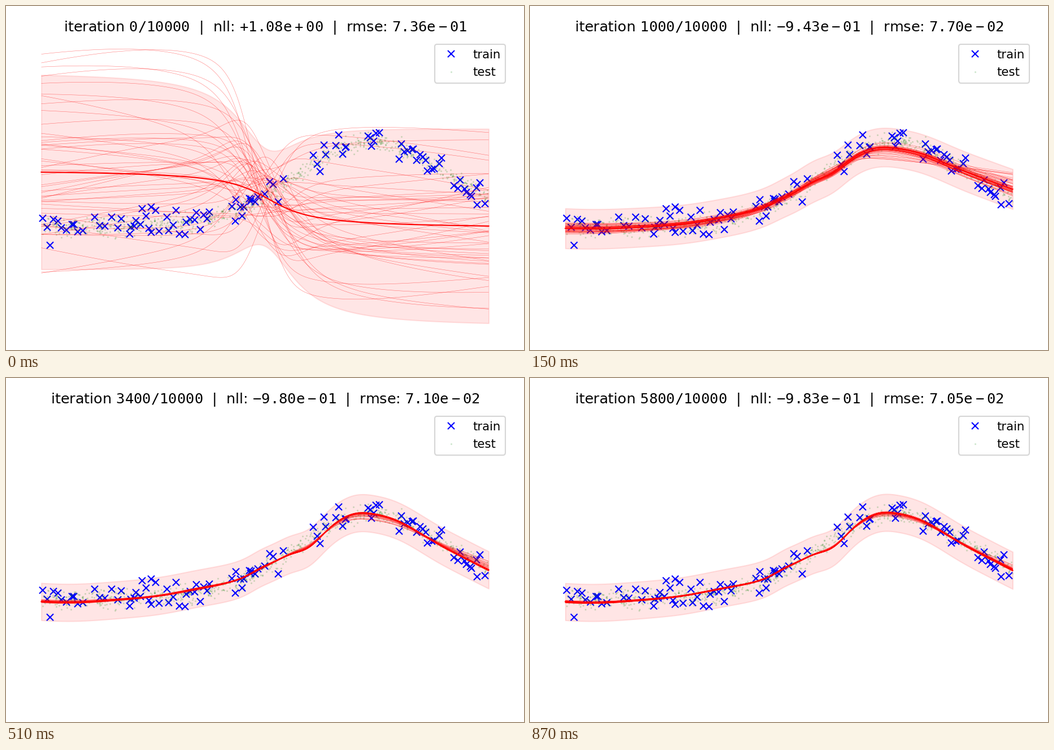
Animation of 917 by 611 pixels, one loop 1.9 s. Source, as a matplotlib script:

```python
import numpy as np
import matplotlib.pyplot as plt
from matplotlib.animation import FuncAnimation
from matplotlib.collections import LineCollection

W, H = 917, 611
DPI = 72                  # one point equals one pixel
PT = 152.8 / 72           # size of a nominal point on the stage
STEP_MS, TICK_MS, LOOP_MS = 30, 10, 1900
LAST = 29
SAMPLES = 50
LEFT, RIGHT, TOP, BOTTOM = 23.4, 894.9, 57.6, 588.1
START, END = 62.5, 854.5

plt.rcParams.update({
    "font.family": "DejaVu Sans",
    "font.size": 10 * PT,
    "axes.titlepad": 6 * PT,
    "lines.linewidth": PT,
    "lines.markersize": 6 * PT,
    "lines.markeredgewidth": PT,
    "patch.linewidth": PT,
    "legend.labelspacing": 0.54,
})


def bump(x, center, width):
    return np.exp(-((x - center) / width) ** 2)


def hill(x, height, peak, left, right, power=2):
    """Rise from the flat left side to a peak, then a fall of its own shape."""
    d = x - peak
    fall = np.where(d < 0, (d / left) ** 2, np.abs(d / right) ** power)
    return 391 - height * np.exp(-fall)


def truth(x):
    return hill(x, 149, 645, 184, 200)


X = np.linspace(START, END, 220)

# Mean curves, in stage pixels: untrained, underfit and converged
UNTRAINED = 343 + 33.7 * np.arctan((X - 465) / 60)
UNDERFIT = hill(X, 121.5, 600, 163, 727, 1.3) + 6 * bump(X, 460, 30)
WIGGLES = [(8, 110, 100), (-8, 345, 70), (-4, 450, 25),
           (15, 537, 32), (-5, 615, 35), (8, 755, 60)]
CONVERGED = truth(X) + sum(a * bump(X, c, w) for a, c, w in WIGGLES)

# Smooth random functions that swing where the untrained mean does
PHASE = 1.2 * np.tanh((X - 455) / 60) + 0.4 * (X - 455) / 400
BASIS = np.array([np.cos(PHASE), np.sin(PHASE),
                  0.6 * np.cos(2 * PHASE), 0.6 * np.sin(2 * PHASE)]) / 1.36 ** 0.5
FLARE = ((X - 460) / 400) ** 2

SCORE_AT = [0, 200, 1000, 1800, 3400, 4600, 5800]
NLL = [1.08, -0.639, -0.943, -0.971, -0.980, -0.984, -0.983]
RMSE = [0.736, 0.124, 0.0770, 0.0719, 0.0710, 0.0704, 0.0705]


def score(values, it):
    return np.interp(np.log(it + 50), np.log(np.add(SCORE_AT, 50)), values)


def predict(k):
    """Mean, half band and sampled functions after k steps."""
    it = 200 * k
    rng = np.random.default_rng(40 + k)
    g = rng.normal(size=(SAMPLES, 4)) @ BASIS
    if k == 0:
        half = 175 - 88 / (1 + ((X - 460) / 66) ** 2)
        return UNTRAINED, half, UNTRAINED + half / 2.1 * g

    fade = np.exp(-(it - 200) / 800)
    mean = CONVERGED + fade * (UNDERFIT - CONVERGED)
    half = 33 + fade * (3 + 4 * FLARE + 7 * bump(X, 500, 45))
    # A few samples lag behind and still follow the underfit curve
    lag = (1000 / it) ** 0.8 * rng.random((SAMPLES, 1)) ** 6
    spread = (0.7 + 8.3 * fade) * (0.8 + 0.6 * FLARE)
    return mean, half, mean + lag * (UNDERFIT - mean) + spread * g


def train_points(rng):
    """Noisy observations in uneven clusters: first x, last x, count."""
    clusters = [(65, 135, 11), (156, 207, 6), (220, 271, 12), (285, 362, 14),
                (400, 445, 11), (458, 488, 5), (545, 568, 5), (585, 604, 5),
                (643, 658, 6), (695, 770, 15), (793, 849, 11)]
    x = np.concatenate([np.linspace(a, b, n) for a, b, n in clusters])
    x = np.clip(x + rng.normal(0, 2, x.size), START, END)
    return x, truth(x) + rng.normal(0, 15, x.size)


rng = np.random.default_rng(7)
train_x, train_y = train_points(rng)
test_x = rng.uniform(START, END, 800)
test_y = truth(test_x) + rng.normal(0, 7.5, test_x.size)

fig = plt.figure(figsize=(W / DPI, H / DPI), dpi=DPI, facecolor="white")
ax = fig.add_axes([LEFT / W, 1 - BOTTOM / H, (RIGHT - LEFT) / W, (BOTTOM - TOP) / H])
ax.set_xlim(LEFT, RIGHT)
ax.set_ylim(BOTTOM, TOP)
ax.axis("off")

ax.plot(train_x, train_y, "x", color="blue", label="train")
ax.plot(test_x, test_y, ".", color="green", ms=PT, alpha=0.18, label="test")
band = ax.fill_between(X, X, X, color="red", alpha=0.1)
samples = LineCollection([], colors="red", linewidths=0.25 * PT,
                         alpha=0.55, zorder=2)
ax.add_collection(samples, autolim=False)
mean_line, = ax.plot([], [], color="red")
title = ax.set_title("")
ax.legend(loc="upper right")


def update(tick):
    k = min(tick * TICK_MS // STEP_MS, LAST)
    it = 200 * k
    mean, half, curves = predict(k)

    band.set_verts([np.r_[np.c_[X, mean - half], np.c_[X, mean + half][::-1]]])
    samples.set_segments([np.c_[X, y] for y in curves])
    mean_line.set_data(X, mean)

    title.set_text(rf"iteration $\mathtt{{{it}/10000}}$  |  "
                   rf"nll: $\mathtt{{{score(NLL, it):+.2e}}}$  |  "
                   rf"rmse: $\mathtt{{{score(RMSE, it):.2e}}}$")
    return band, samples, mean_line, title


anim = FuncAnimation(fig, update, frames=LOOP_MS // TICK_MS,
                     interval=TICK_MS, repeat=True, repeat_delay=0)
plt.show()
```
